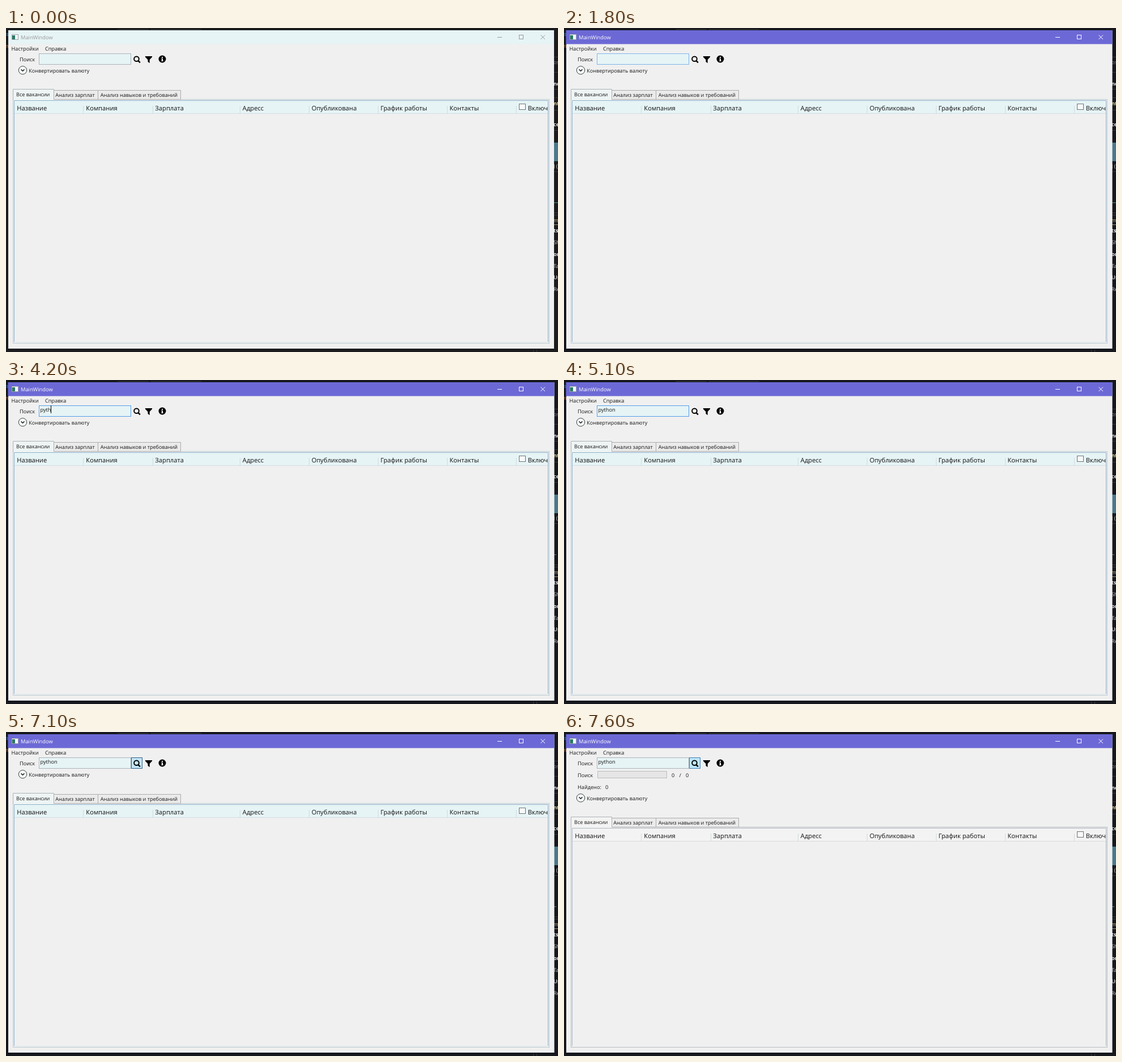
These frames come from a looping animation (975x574 px, 8 s). An HTML page with a canvas:

```html
<!DOCTYPE html>
<html lang="ru">
<head>
<meta charset="utf-8">
<title>MainWindow</title>
<style>
html, body { margin: 0; width: 100%; height: 100%; overflow: hidden; background: #1c1c1e; }
canvas { display: block; }
</style>
</head>
<body>
<canvas id="stage" width="975" height="574"></canvas>
<script>
const c = document.getElementById('stage').getContext('2d');
const LOOP = 8000, MINT = '#e6f4f6', FACE = '#f0f0f0';
const FONT = '"Open Sans", "Noto Sans", sans-serif';
const typing = [[3500, 'p'], [3700, 'py'], [4100, 'pyt'], [4200, 'pyth'], [4400, 'pytho'], [4600, 'python']];
const caretSpans = [[1900, 2300], [2800, 3300], [3500, 5100], [5600, 6000], [6600, 7000]];

function box(x, y, w, h, fill, stroke) {
  if (fill) { c.fillStyle = fill; c.fillRect(x, y, w, h); }
  if (stroke) {
    c.strokeStyle = stroke;
    c.lineWidth = 1;
    c.strokeRect(x + .5, y + .5, w - 1, h - 1);
  }
}

function text(s, x, y, size = 9.2, color = '#161616', weight = 400) {
  c.font = `${weight} ${size}px ${FONT}`;
  c.fillStyle = color;
  c.fillText(s, x, y);
}

function line(points, color, width = 1) {
  c.strokeStyle = color;
  c.lineWidth = width;
  c.beginPath();
  points.forEach(([x, y]) => c.lineTo(x, y));
  c.stroke();
}

function disc(x, y, r, fill, stroke, width = 1) {
  c.beginPath();
  c.arc(x, y, r, 0, 7);
  if (fill) { c.fillStyle = fill; c.fill(); }
  if (stroke) { c.strokeStyle = stroke; c.lineWidth = width; c.stroke(); }
}

// Slivers of the dark editor behind the window
function backdrop(t) {
  box(0, 0, 975, 574, t < 1800 ? '#1c1c1e' : '#17181d');
  box(197, 2, 55, 1, '#39393b');
  box(255, 2, 90, 1, '#39393b');
  text('s', 0, 14, 9, '#3c8fd0');
  text('m', -4, 35, 9, '#c77f52');
  [51, 78, 108, 123, 145, 181, 254, 327, 331].forEach(y => box(968, y, 7, 1, '#3a3a3c'));
  box(968, 203, 7, 33, '#4c788c');
  [['os', 64, '#858585'], ['nc', 102, '#eee', 700], ['nt', 137, '#e3d9a0', 700],
   ['ce', 174, '#eee', 700], ['J (', 248, '#ccc'], ['ma', 344, '#d9c08c'],
   ['ts', 362, '#eee', 700], ['Sh', 383, '#ccc'], ['on', 404, '#eee', 700],
   ['Ta', 425, '#ccc'], ['Us', 445, '#ddd', 600], ['Re', 466, '#ccc']
  ].forEach(([s, y, color, weight]) => text(s, 967, y, 9.2, color, weight));
  box(968, 348, 7, 1, '#a3977a');
  box(968, 309, t < 2300 ? 7 : 4, 1, '#4d8e94');
  [931, 937].forEach(x => box(x, 570, 1, 4, '#39393b'));
}

function titleBar(t) {
  const active = t >= 1800, ink = active ? '#fff' : '#999';
  box(4, 4, active ? 964.5 : 964, 564, FACE);
  box(active ? 3.5 : 4, 4, active ? 965 : 964, 24.5, active ? '#6c69d6' : MINT);
  if (t >= 500 && !active) box(930, 5, 38, 23, '#f8f9f9');
  box(10, 11, 12, 10, '#f4f8f8', '#9aa5a8');
  box(11, 13, 5, 7, '#2c7868');
  text('MainWindow', 26, 20, 9.3, ink);
  box(868, 16, 8, 1, ink);
  box(906, 12, 8, 8, null, ink);
  line([[944.5, 12.5], [952, 20]], ink);
  line([[952, 12.5], [944.5, 20]], ink);
}

function searchRow(t) {
  text('Настройки', 9.5, 39.5);
  text('Справка', 69, 39.5);
  text('Поиск', 24, 59);
  const border = t < 1400 || t >= 7000 ? '#abb3ba' : t < 1900 ? '#7eb4ea' : '#569de5';
  box(58, 45, 163, 20, MINT, border);

  const typed = typing.reduce((s, [at, word]) => t >= at ? word : s, '');
  text(typed, 60.5, 56);
  if (caretSpans.some(([a, b]) => t >= a && t < b))
    box(Math.round(60.3 + c.measureText(typed).width), 45, 1, 14, '#000');

  const pressed = t >= 7000 && t < 7400;
  if (t >= 6300)
    box(221, 45, 20, 20, pressed ? '#c4e5f6' : '#bee6fd', pressed ? '#2c628b' : '#3c7fb1');
  disc(230.5, 54.8, 4.3, null, '#000', 2);
  line([[233.4, 57.8], [236.9, 61.3]], '#000', 2.5);

  c.fillStyle = '#000';
  c.fill(new Path2D('M245.8 50h12.4l-.2 1.4-4.3 4.8v6l-3.2-2.5v-3.5l-4.5-4.8z'));

  disc(276, 55, 6.5, '#000');
  c.fillStyle = '#fff';
  c.fill(new Path2D('M275 51h2v2h-2zM274.3 53.9h2.7v3.8h.8v1.2h-3.5v-1.2h.8v-2.6h-.8z'));
}

function progressRow() {
  text('Поиск', 24, 80);
  box(59, 69, 123, 13, '#e6e6e6', '#bcbcbc');
  text('0', 190, 80);
  text('/', 203.5, 80);
  text('0', 215, 80);
  text('Найдено:', 24, 101);
  text('0', 73, 101);
}

function content(t) {
  const searching = t >= 7400, dy = searching ? 42 : 0;
  const head = searching ? '#f3f3f3' : MINT, hover = t >= 600 && t < 1300;
  c.save();
  c.translate(0, dy);

  disc(29.5, 74.8, 7.2, hover ? '#f3f9ff' : '#f7fafa', hover ? '#5593ff' : '#333c40');
  line([[26.6, 73.4], [29.5, 76.3], [32.4, 73.4]], hover ? '#000' : '#222', 1.5);
  text('Конвертировать валюту', 40.3, 78.7, 9.05);

  // Tabs and their panel
  box(12, 126, 948, 433 - dy, FACE, searching ? '#b8bdc1' : '#bccbd1');
  box(84, 110, 79, 17, '#ebebeb', '#acacac');
  box(162, 110, 147, 17, '#ebebeb', '#acacac');
  box(12, 108, 73, 20, searching ? '#f3f3f3' : '#eef4f4');
  line([[12.5, 128], [12.5, 108.5], [84.5, 108.5], [84.5, 127]], '#acb1b5');
  text('Все вакансии', 18, 121.2, 9.1);
  text('Анализ зарплат', 87.2, 122.3, 9.1);
  text('Анализ навыков и требований', 166.7, 122.3, 9.1);

  // Table
  box(15, 129, 942, 23, head);
  box(15, 151, 942, 1, searching ? '#dadada' : '#d3dde0');
  line([[14.5, 556 - dy], [14.5, 128.5], [957.5, 128.5], [957.5, 556 - dy]],
    searching ? '#a9b6c2' : '#8fb0cb');
  if (!searching) box(15, 556, 942, 1, '#dce8ec');

  c.beginPath();
  c.rect(15, 129, 942, 24);
  c.clip();
  [[19.3, 'Название'], [141.3, 'Компания'], [263.3, 'Зарплата'], [417.8, 'Адресс'],
   [539.7, 'Опубликована'], [661.5, 'График работы'], [783.5, 'Контакты'], [921.7, 'Включить']
  ].forEach(([x, s]) => text(s, x, 145.5, 11.2, '#111'));
  [136, 259, 413, 535, 657, 779, 901].forEach(x => box(x, 138, 1, 14, '#d2dadd'));
  box(906, 134, 12, 11, '#f7fafa', '#707070');
  c.restore();
}

function draw(now) {
  const t = now % LOOP;
  c.textRendering = 'geometricPrecision';
  backdrop(t);
  titleBar(t);
  searchRow(t);
  if (t >= 7400) progressRow();
  content(t);
  requestAnimationFrame(draw);
}
requestAnimationFrame(draw);
</script>
</body>
</html>
```
